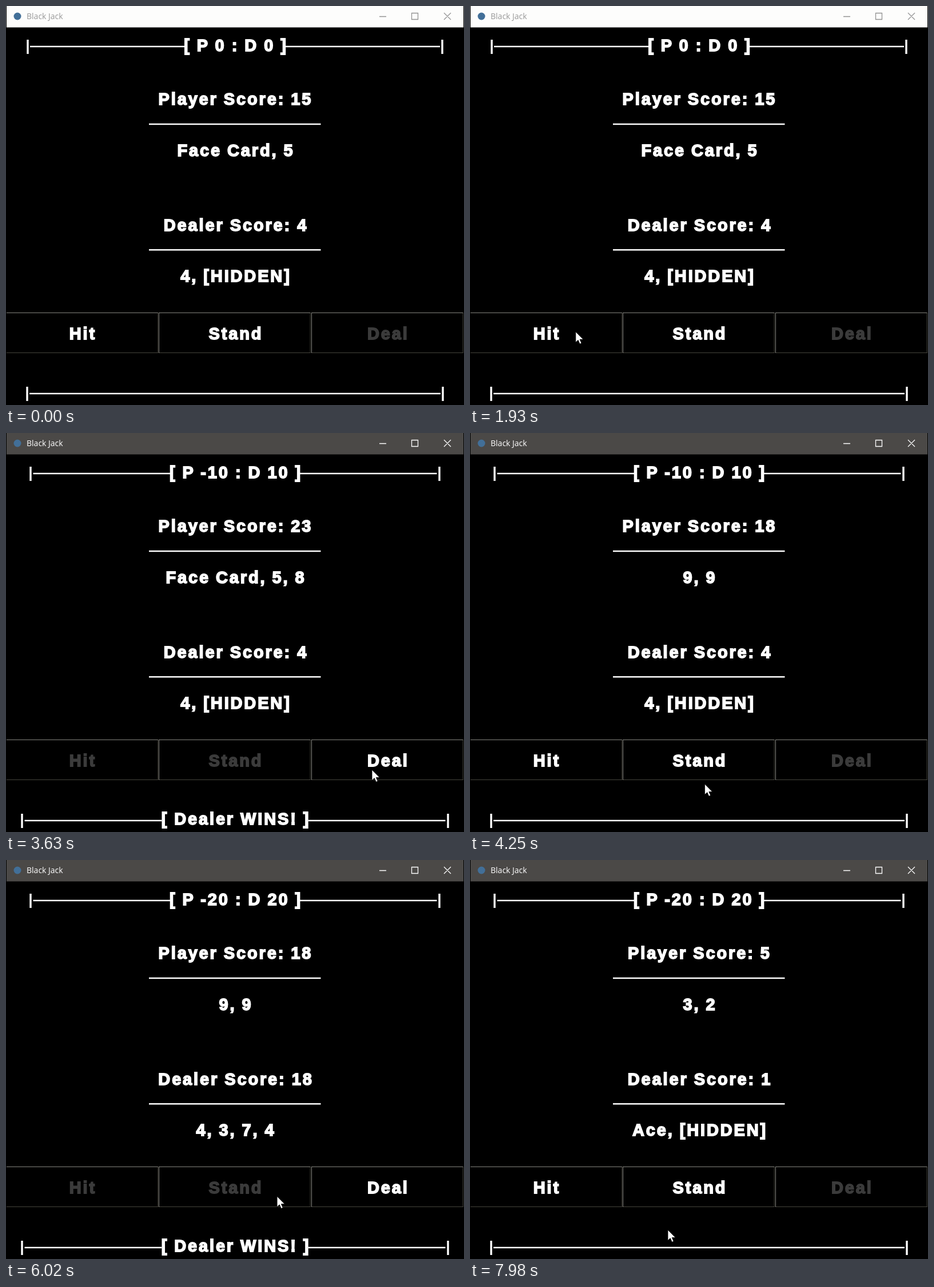
Animation of 801 by 699 pixels, one loop 8000 ms. Source, as an HTML page:

```html
<!DOCTYPE html>
<html lang="en">
<head>
<meta charset="utf-8">
<title>Black Jack</title>
<style>
  html, body { margin: 0; width: 100%; height: 100%; overflow: hidden; background: #000; }
  svg { display: block; width: 100%; height: 100%; }
  .big text {
    font: bold 29px "Liberation Sans", Arial, sans-serif;
    letter-spacing: 2.85px; word-spacing: -0.8px; text-anchor: middle; white-space: pre;
    fill: currentColor; stroke: currentColor; stroke-width: 1.8px;
  }
  .big { color: #fff; }
  .off { color: #3b3b3b; }
  #caption { font: 14px "Open Sans", "Noto Sans", sans-serif; }
  .rule { fill: none; stroke: #fff; stroke-width: 2.4px; }
  .bar { fill: none; stroke: #fff; stroke-width: 3.4px; }
  .light { fill: none; stroke: #85857f; }
  .shade { fill: none; stroke: #45443c; }
</style>
</head>
<body>
<svg viewBox="0 0 801 699" preserveAspectRatio="none">
  <rect width="801" height="699"/>
  <rect id="titlebar" x="1" width="799" height="37.5"/>
  <circle cx="20" cy="18" r="6.5" fill="#426f98"/>
  <text id="caption" x="36" y="23.3">Black Jack</text>
  <path id="controls" fill="none" stroke-width="1.3"
        d="M653 18.5H665 M709.5 12.5H720.5V23.5H709.5Z M766 12L778 24M778 12L766 24"/>
  <path class="rule" d="M250 207H550.5M250 427.3H550.5"/>
  <path id="rules" class="rule"/>
  <path id="bars" class="bar"/>
  <g id="buttons"></g>
  <g class="big">
    <text id="tally" x="402" y="78.6"></text>
    <text id="playerScore" x="401.4" y="173"></text>
    <text id="playerCards" x="402" y="263"></text>
    <text id="dealerScore" x="402" y="393.6"></text>
    <text id="dealerCards" x="402" y="483.4"></text>
    <text id="hit" x="134.4" y="584">Hit</text>
    <text id="stand" x="402" y="584">Stand</text>
    <text id="deal" x="668.4" y="584">Deal</text>
    <text id="result" x="402" y="686.4"></text>
  </g>
  <path id="cursor" d="M0 0V18.5L4.3 14.6L7.2 21.3L10.2 20L7.3 13.4H13.3Z"
        fill="#fff" stroke="#000" stroke-width="0.8"/>
</svg>
<script>
const LOOP = 8000;
const $ = id => document.getElementById(id);

// Each round state holds until the next click.
const states = [
  { at: 0, tally: "P 0 : D 0", player: 15, hand: "Face Card, 5",
    dealer: 4, table: "4, [HIDDEN]", inactive: true },
  { at: 2050, tally: "P -10 : D 10", player: 23, hand: "Face Card, 5, 8",
    dealer: 4, table: "4, [HIDDEN]", over: true },
  { at: 3700, tally: "P -10 : D 10", player: 18, hand: "9, 9",
    dealer: 4, table: "4, [HIDDEN]" },
  { at: 5560, tally: "P -20 : D 20", player: 18, hand: "9, 9",
    dealer: 18, table: "4, 3, 7, 4", over: true },
  { at: 7000, tally: "P -20 : D 20", player: 5, hand: "3, 2",
    dealer: 1, table: "Ace, [HIDDEN]" }
];

// Pointer stops: time, x, y
const stops = [
  [300, 801, 640], [900, 193, 570], [1700, 193, 570], [2350, 170, 572],
  [2650, 172, 572], [2990, 238, 570], [3270, 508, 588], [3550, 640, 590],
  [3800, 640, 590], [4110, 542, 607], [4250, 411, 615], [4480, 317, 621],
  [4910, 330, 606], [5370, 342, 592], [5700, 342, 592], [6400, 630, 586],
  [6840, 637, 587], [7100, 637, 587], [7380, 594, 610], [7740, 370, 655],
  [7980, 346, 648]
];

$("buttons").innerHTML = [1, 267.5, 534.5].map(x => `
  <path class="shade" d="M${x} 607.5H${x + 265}M${x + 264.7} 538V608"/>
  <path class="light" d="M${x} 537.5H${x + 265}${x > 1 ? `M${x} 537V608` : ""}"/>`).join("");

function pointerAt(t) {
  const next = stops.findIndex(stop => stop[0] > t);
  if (next === 0) return null;
  if (next < 0) return stops[stops.length - 1].slice(1);
  const [t0, x0, y0] = stops[next - 1], [t1, x1, y1] = stops[next];
  const k = (t - t0) / (t1 - t0);
  return [x0 + (x1 - x0) * k, y0 + (y1 - y0) * k];
}

const rulePair = (y, start, end) => `M${start} ${y}H${end}M${801 - end} ${y}H${801 - start}`;
const barPair = (y, x) => `M${x} ${y}v25M${801 - x} ${y}v25`;

function showState(s) {
  $("tally").textContent = `[ ${s.tally} ]`;
  $("playerScore").textContent = `Player Score: ${s.player}`;
  $("playerCards").textContent = s.hand;
  $("dealerScore").textContent = `Dealer Score: ${s.dealer}`;
  $("dealerCards").textContent = s.table;
  $("result").textContent = s.over ? "[ Dealer WINS! ]" : "";
  $("hit").classList.toggle("off", !!s.over);
  $("stand").classList.toggle("off", !!s.over);
  $("deal").classList.toggle("off", !s.over);

  $("rules").setAttribute("d",
    (s.inactive ? rulePair(71, 42, 312.5) : rulePair(71, 47.5, 287.5)) +
    (s.over ? rulePair(679, 32.5, 272.5) : "M41 679H760"));
  $("bars").setAttribute("d",
    barPair(59, s.inactive ? 38 : 43) + barPair(667, s.over ? 28 : 37));

  $("titlebar").setAttribute("fill", s.inactive ? "#fdfdfc" : "#4b4947");
  $("caption").setAttribute("fill", s.inactive ? "#999" : "#fff");
  $("controls").setAttribute("stroke", s.inactive ? "#929292" : "#fff");
}

let shown;
function draw() {
  const t = performance.now() % LOOP;
  const state = states.filter(s => s.at <= t).pop();
  if (state !== shown) showState(shown = state);

  const pointer = pointerAt(t);
  $("cursor").setAttribute("visibility", pointer ? "visible" : "hidden");
  if (pointer) $("cursor").setAttribute("transform", `translate(${pointer})`);
  requestAnimationFrame(draw);
}
draw();
</script>
</body>
</html>
```
